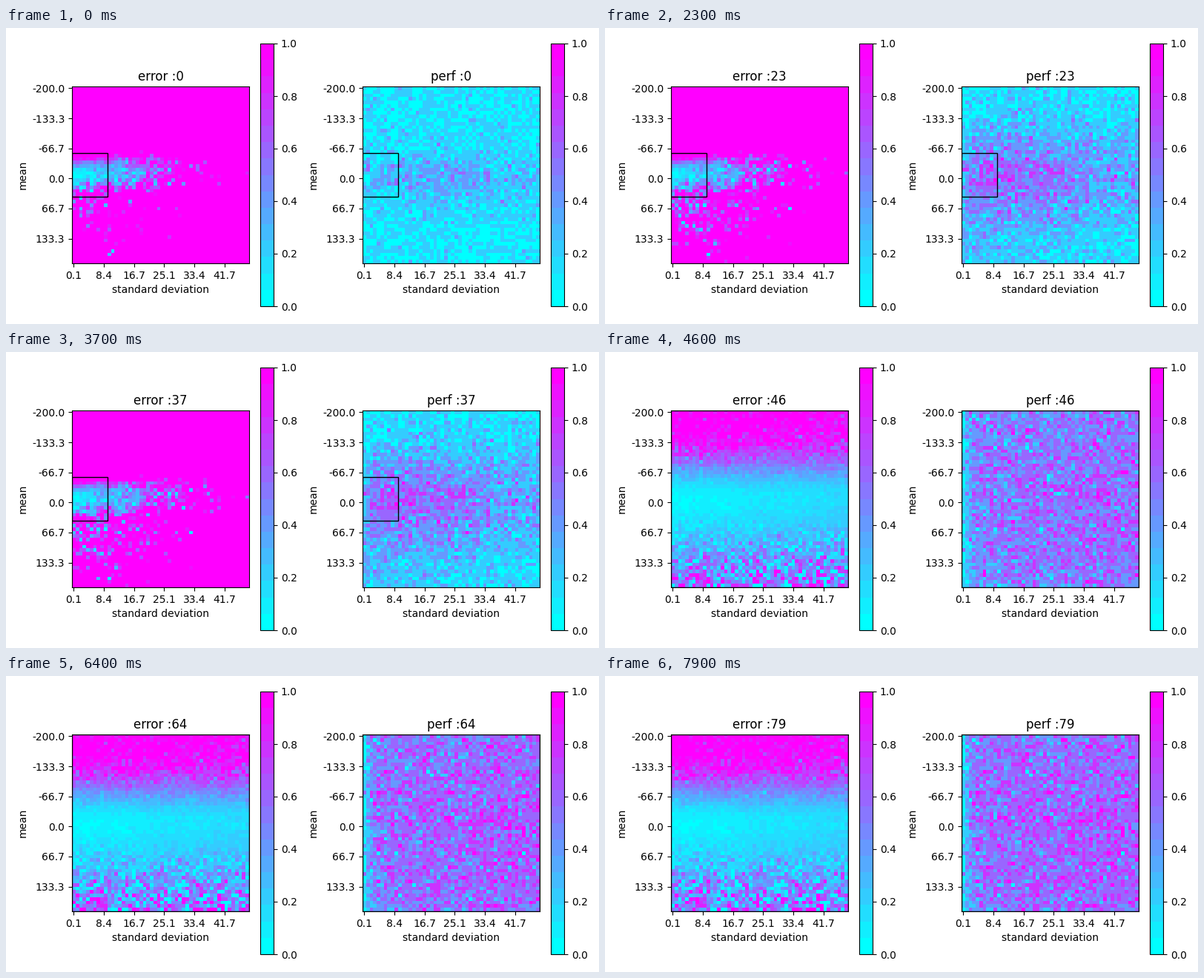
Write a matplotlib script that moves like this. It is 800 px wide and 400 px high and loops after 8 s.

```python
import numpy as np
import matplotlib.pyplot as plt
from matplotlib.animation import FuncAnimation
from matplotlib.patches import Rectangle

W, H, DPI = 800, 400, 100
N, FRAMES, SWITCH = 50, 80, 40

rng = np.random.default_rng(7)
row, col = np.mgrid[0:N, 0:N].astype(float)
above = np.maximum(24.5 - row, 0)
below = np.maximum(row - 25.5, 0)


def ramp(x, start, end):
    return np.clip((x - start) / (end - start), 0, 1)


def smooth(t):
    return t * t * (3 - 2 * t)


def make_noise(mean_delay):
    """Per-cell noise: an early draw replaced by a later one at a random step."""
    early, late = rng.standard_normal((2, N, N))
    when = rng.exponential(mean_delay, (N, N))
    return lambda step: np.where(step > when, .4 * early + .9 * late, early)


narrow_error_noise, wide_error_noise = make_noise(40), make_noise(30)
narrow_perf_noise, wide_perf_noise = make_noise(12), make_noise(20)


def narrow_error(step):
    pending = np.exp(-step / 6)
    level = .08 + .9 * (col / 33) ** 1.5
    level += .85 * (above / (4.6 + col / 10)) ** 2
    level += .75 * ramp(below, 0, 4) + .07 * np.maximum(below - 12, 0)
    level += .25 * pending * np.maximum(ramp(col, 20, 32), ramp(below, 1, 5))
    spread = np.minimum(.04 + .01 * col + .35 * ramp(below, 0, 4), .46)
    return level + spread * narrow_error_noise(step)


def wide_error(step):
    level = .05 + 1.02 * smooth(ramp(above, 0, 21)) + .5 * (below / 23) ** 1.2
    level += .12 * (col / N) * np.exp(-((row - 25) / 9) ** 2)
    level -= .12 * (col / N) * ramp(above, 10, 16)
    spread = .025 + .11 * ramp(above, 4, 13) + .34 * ramp(row, 30, 49)
    return level + spread * wide_error_noise(step)


def narrow_perf(step):
    progress = 1 - np.exp(-step / 6)
    ridge = np.exp(-((row - 25) / (8 + 6 * progress)) ** 2)
    early = .1 + .23 * ridge * np.exp(-((col - 24) / 26) ** 2)
    fall = 1 - .6 * np.exp(-col / 2) - .5 * ramp(col, 15, 49)
    late = .1 + (.42 + .0015 * step) * ridge * fall
    late += .1 * (row / N) * (1 - col / N)
    level = early + (late - early) * progress
    spread = .1 + .03 * progress + .05 * ridge
    return level + spread * narrow_perf_noise(step)


def wide_perf(step):
    gain = 1 - np.exp(-(step + 1) / 9)
    level = .44 + .14 * gain + .05 * np.exp(-((row - 25) / 14) ** 2)
    level *= (1 - .8 * np.exp(-col / 1.8)) * (.94 + .12 * col / N)
    return level + .17 * wide_perf_noise(step)


def maps(k):
    if k < SWITCH:
        error, perf = narrow_error(k), narrow_perf(k)
    else:
        error, perf = wide_error(k - SWITCH), wide_perf(k - SWITCH)
    return np.clip(error, 0, 1), np.clip(np.round(perf * 5) / 5, 0, 1)


fig = plt.figure(figsize=(W / DPI, H / DPI), dpi=DPI)


def add_box(left, top, right, bottom):
    return fig.add_axes([left / W, 1 - bottom / H,
                         (right - left) / W, (bottom - top) / H])


def add_panel(x):
    ax = add_box(x, 79, x + 239, 318)
    image = ax.imshow(np.zeros((N, N)), cmap=plt.get_cmap("cool", 16), vmin=0,
                      vmax=1, interpolation="nearest", aspect="auto")
    ticks = 8.5 * np.arange(6)
    ax.set_xticks(ticks, [f"{.1 + 8.32 * i:.1f}" for i in range(6)])
    ax.set_yticks(ticks, [f"{-200 + 200 * i / 3:.1f}" for i in range(6)])
    ax.set_xlabel("standard deviation")
    ax.set_ylabel("mean")
    box = ax.add_patch(Rectangle((0, 0), 1, 1, fill=False, ec="black", lw=1))
    fig.colorbar(image, cax=add_box(x + 254, 21, x + 272, 376))
    return ax, image, box


panels = [add_panel(89), add_panel(481)]


def update(k):
    bounds = (-.5, 18.3, 10, 12.4) if k < SWITCH else (-.5, -.5, N, N)
    for (ax, image, box), name, data in zip(panels, ("error", "perf"), maps(k)):
        image.set_data(data)
        box.set_bounds(*bounds)
        ax.set_title(f"{name} :{k}")


anim = FuncAnimation(fig, update, frames=FRAMES, interval=100,
                     repeat=True, repeat_delay=0)
plt.show()
```
